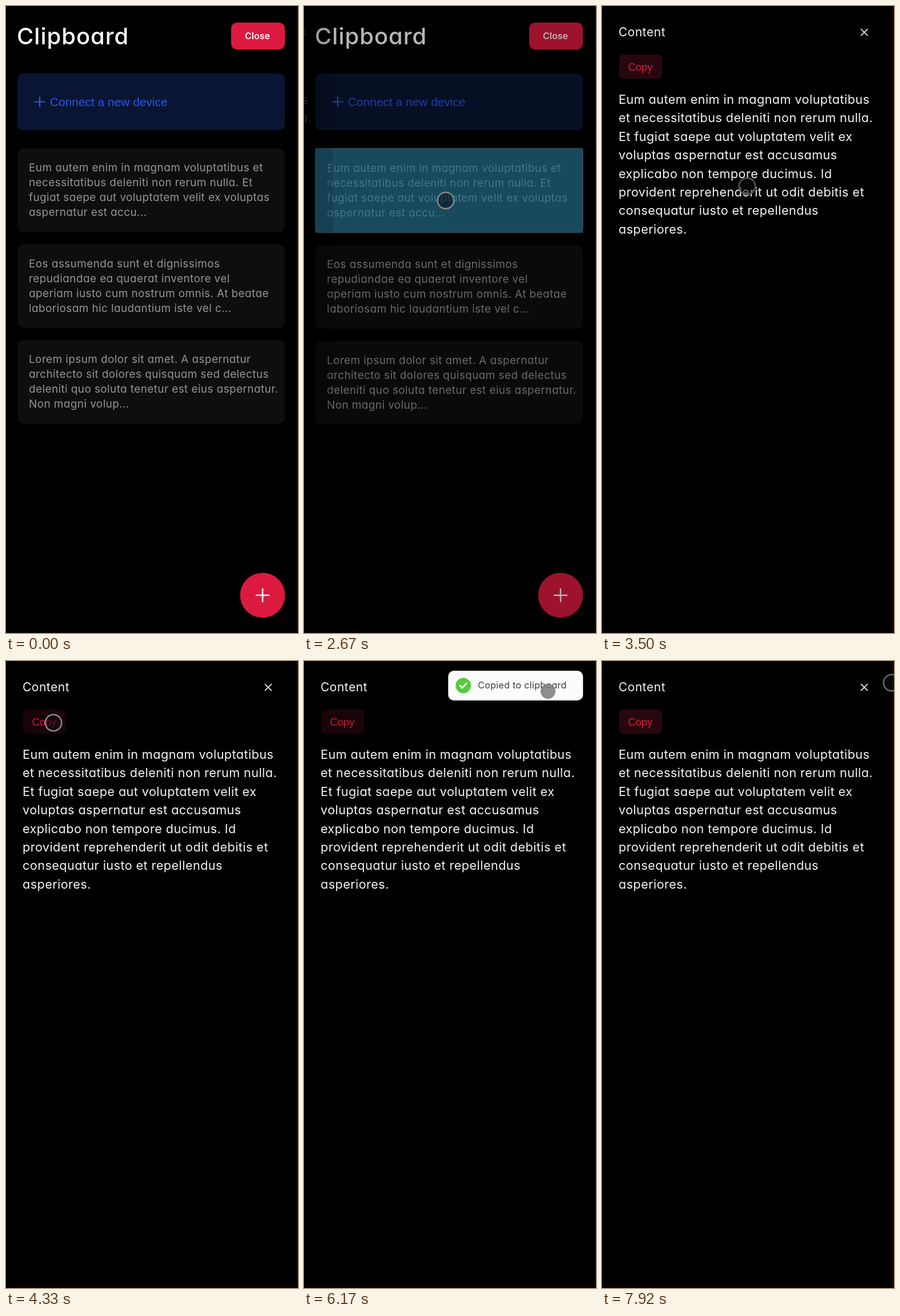
An HTML page for the animation above (8 s loop, 511x1096 px).

```html
<!DOCTYPE html>
<html lang="en">
<head>
<meta charset="utf-8">
<title>Clipboard</title>
<style>
  html, body { margin: 0; width: 100%; height: 100%; overflow: hidden; background: #000; }
  svg { display: block; width: 511px; height: 1096px; }
  text { font-family: Inter, "Open Sans", sans-serif; font-feature-settings: "cv11"; fill: #f4f4f4; white-space: pre; }
  .title { font-size: 40px; font-weight: 500; letter-spacing: 1px; fill: #fff; }
  .button { font-size: 16px; font-weight: 600; fill: #fff; }
  .snippet { font-size: 19px; letter-spacing: .38px; fill: #949396; }
  .body { font-size: 21.7px; letter-spacing: .4px; }
  .head { font-size: 21px; letter-spacing: .5px; }
  .note { font-size: 16px; letter-spacing: .33px; fill: #3c3c3c; }
  .plain { font-family: "Liberation Sans", Arial, sans-serif; }
  .line { fill: none; stroke: #fff; stroke-linecap: round; }
</style>
</head>
<body>
<svg viewBox="0 0 511 1096">
  <rect width="511" height="1096"/>
  <g id="home">
    <text class="title" x="19" y="67">Clipboard</text>
    <rect x="394" y="29" width="94" height="47" rx="10" fill="#dc1a40"/>
    <text class="button" x="418" y="57.5">Close</text>
    <rect x="20" y="118" width="468" height="99" rx="10" fill="#0a1533"/>
    <path class="line" style="stroke:#2659e8" stroke-width="2.2" d="M50.5 167.5h17M59 159v17"/>
    <text class="plain" x="77" y="175" font-size="20.9" style="fill:#2659e8">Connect a new device</text>
    <g id="cards"></g>
    <g id="tap">
      <rect x="19.5" y="248.5" width="469" height="148" fill="#33b5e5" opacity=".54"/>
      <rect x="20" y="249" width="468" height="147" rx="10" fill="none" stroke="#b7899a" stroke-opacity=".5"/>
    </g>
    <circle cx="449" cy="1030" r="39.3" fill="#dc1a40"/>
    <path class="line" stroke-width="2.5" d="M438 1030h22M449 1019v22"/>
  </g>
  <g id="detail">
    <rect width="511" height="1096"/>
    <text class="head" x="29" y="53">Content</text>
    <path class="line" stroke-width="1.7" d="M453.5 40.5l11 11m0-11l-11 11"/>
    <rect id="copyBox" x="30" y="85" width="75" height="42" rx="7"/>
    <text class="plain" id="copyText" x="45.5" y="113" font-size="18.4">Copy</text>
    <g id="lines"></g>
  </g>
  <path fill="#0c0f0e" d="M508.5 0h2.5v1096h-2.5z"/>
  <path fill="#0a0206" d="M0 1093h511v3H0z"/>
  <g id="toast">
    <rect x="-118" y="-26" width="236" height="52" rx="10" fill="#fcfcfc"/>
    <text class="note" x="-66" y="5">Copied to clipboard</text>
    <g id="badge">
      <circle r="13.4" fill="#55cb3f"/>
      <path id="tick" class="line" stroke-width="2.8" pathLength="100" d="M-5.8 0L-2 4L5.8-4"/>
    </g>
  </g>
  <g id="cursor">
    <circle id="ring" r="14.3" stroke-width="2.5"/>
    <g id="move" fill="#111" stroke="#b0b0b0" stroke-width="1"></g>
  </g>
</svg>
<script>
const $ = id => document.getElementById(id);
const PERIOD = 8000, FPS = 12;

const cards = [
  ["Eum autem enim in magnam voluptatibus et", "necessitatibus deleniti non rerum nulla. Et",
   "fugiat saepe aut voluptatem velit ex voluptas", "aspernatur est accu..."],
  ["Eos assumenda sunt et dignissimos", "repudiandae ea quaerat inventore vel",
   "aperiam iusto cum nostrum omnis. At beatae", "laboriosam hic laudantium iste vel c..."],
  ["Lorem ipsum dolor sit amet. A aspernatur", "architecto sit dolores quisquam sed delectus",
   "deleniti quo soluta tenetur est eius aspernatur.", "Non magni volup..."]
];
const article = ["Eum autem enim in magnam voluptatibus", "et necessitatibus deleniti non rerum nulla.",
  "Et fugiat saepe aut voluptatem velit ex", "voluptas aspernatur est accusamus",
  "explicabo non tempore ducimus. Id", "provident reprehenderit ut odit debitis et",
  "consequatur iusto et repellendus", "asperiores."];

const textLines = (rows, cls, x, y, step) =>
  rows.map((row, i) => `<text class="${cls}" x="${x}" y="${y + i * step}">${row}</text>`).join("");

$("cards").innerHTML = cards.map((rows, i) => `<g transform="translate(0 ${249 + i * 167.5})">
  <rect x="20" width="468" height="146" rx="10" fill="#0e0d10"/>
  ${textLines(rows, "snippet", 40, 40, 26.1)}</g>`).join("");
$("lines").innerHTML = textLines(article, "body", 29, 171, 32.4);
$("move").innerHTML = [0, 90, 180, 270].map(a =>
  `<path transform="rotate(${a})" d="M0-10.5L4.5-6H1.8v4.2H-1.8V-6H-4.5Z"/>`).join("");

const clamp = v => Math.max(0, Math.min(1, v));
const progress = (t, start, length) => clamp((t - start) / length);
const between = (t, a, b) => t >= a && t < b;
const show = (id, on) => $(id).setAttribute("visibility", on ? "visible" : "hidden");
const place = (id, value) => $(id).setAttribute("transform", value);

function bezier(x1, y1, x2, y2) {
  const curve = (s, a, b) => 3 * (1 - s) ** 2 * s * a + 3 * (1 - s) * s * s * b + s ** 3;
  return x => {
    let lo = 0, hi = 1;
    for (let i = 0; i < 24; i++) {
      const mid = (lo + hi) / 2;
      if (curve(mid, x1, x2) < x) lo = mid; else hi = mid;
    }
    return curve(lo, y1, y2);
  };
}
const easeInOut = bezier(.42, 0, .58, 1);
const easeOut = bezier(0, 0, .58, 1);
const dropIn = bezier(.21, 1.02, .73, 1);
const flyOut = bezier(.06, .71, .55, 1);
const pop = bezier(.175, .885, .32, 1.275);

// Pointer stops: time, x, y
const track = [[1900, 271, 320], [2080, 271, 320], [2420, 248, 340], [3420, 248, 340], [3500, 254, 315],
  [4300, 83, 108], [5120, 83, 108], [5900, 436, 47], [6160, 427, 53], [6250, 427, 53],
  [6740, 52, 127], [6900, 49, 127], [7580, 398, 112], [7900, 507, 38], [8000, 507, 38]];

function pointerAt(t) {
  const i = Math.max(1, track.findIndex(p => p[0] >= t));
  const [a, b] = [track[i - 1], track[i]];
  const p = easeInOut(progress(t, a[0], b[0] - a[0]));
  return [a[1] + (b[1] - a[1]) * p, a[2] + (b[2] - a[2]) * p];
}

function drawPages(t) {
  const raw = progress(t, 2590, 350), slide = easeInOut(raw);
  $("home").setAttribute("opacity", clamp(1 - raw * 1.3));
  show("home", raw < 1);
  show("tap", between(t, 2580, 2800));
  const pressed = between(t, 2580, 3000);
  [...$("cards").children].forEach((card, i) =>
    card.setAttribute("transform", `translate(0 ${249 + i * 167.5 + (pressed ? (i ? 1.5 : .7) : 0)})`));
  show("detail", raw > 0);
  $("detail").setAttribute("opacity", clamp(slide * 1.3));
  place("detail", `translate(${-511 * (1 - slide)})`);
  const dim = between(t, 4250, 7250);
  $("copyBox").setAttribute("fill", dim ? "#190409" : "#27070e");
  $("copyText").style.fill = dim ? "#cd193d" : "#dc1a40";
}

function drawToast(t) {
  const start = 4680, leave = 6830;
  const enter = dropIn(progress(t, start, 350)), exit = flyOut(progress(t, leave, 400));
  show("toast", between(t, start, leave + 400));
  const y = 43 - 104 * (1 - enter) - 78 * exit;
  place("toast", `translate(370.3 ${y}) scale(${.6 + .4 * enter - .4 * exit})`);
  $("toast").setAttribute("opacity", (.5 + .5 * enter) * (1 - exit));
  const grow = pop(progress(t, start + 100, 300));
  place("badge", `translate(-91.5 0) rotate(${(grow - 1) * 45}) scale(${grow})`);
  const drawn = easeOut(progress(t, start + 200, 200)) * 100;
  $("tick").setAttribute("stroke-dasharray", `${drawn} 200`);
  show("tick", drawn > 0 && between(t, start, leave + 400));
}

function drawCursor(t) {
  const visible = between(t, 1900, 7600) || t > 7900;
  const dragging = t < 2300;
  const pressed = between(t, 6100, 6270);
  place("cursor", `translate(${pointerAt(t)})`);
  show("move", visible && dragging);
  show("ring", visible && !dragging);
  const ring = $("ring");
  ring.setAttribute("r", pressed ? 13 : 14.3);
  ring.setAttribute("fill", pressed ? "rgba(125,122,124,.86)" : "rgba(15,15,18,.55)");
  ring.setAttribute("stroke", pressed ? "none" : t > 2700 && t < 3600 ? "#555" : t > 7900 ? "#6a6a6a" : "#87898c");
}

function frame(now) {
  const step = Math.min(95, Math.floor((now % PERIOD + 4) * FPS / 1000));
  const t = step * 1000 / FPS;
  drawPages(t);
  drawToast(t);
  drawCursor(t);
  requestAnimationFrame(frame);
}
frame(0);
</script>
</body>
</html>
```
